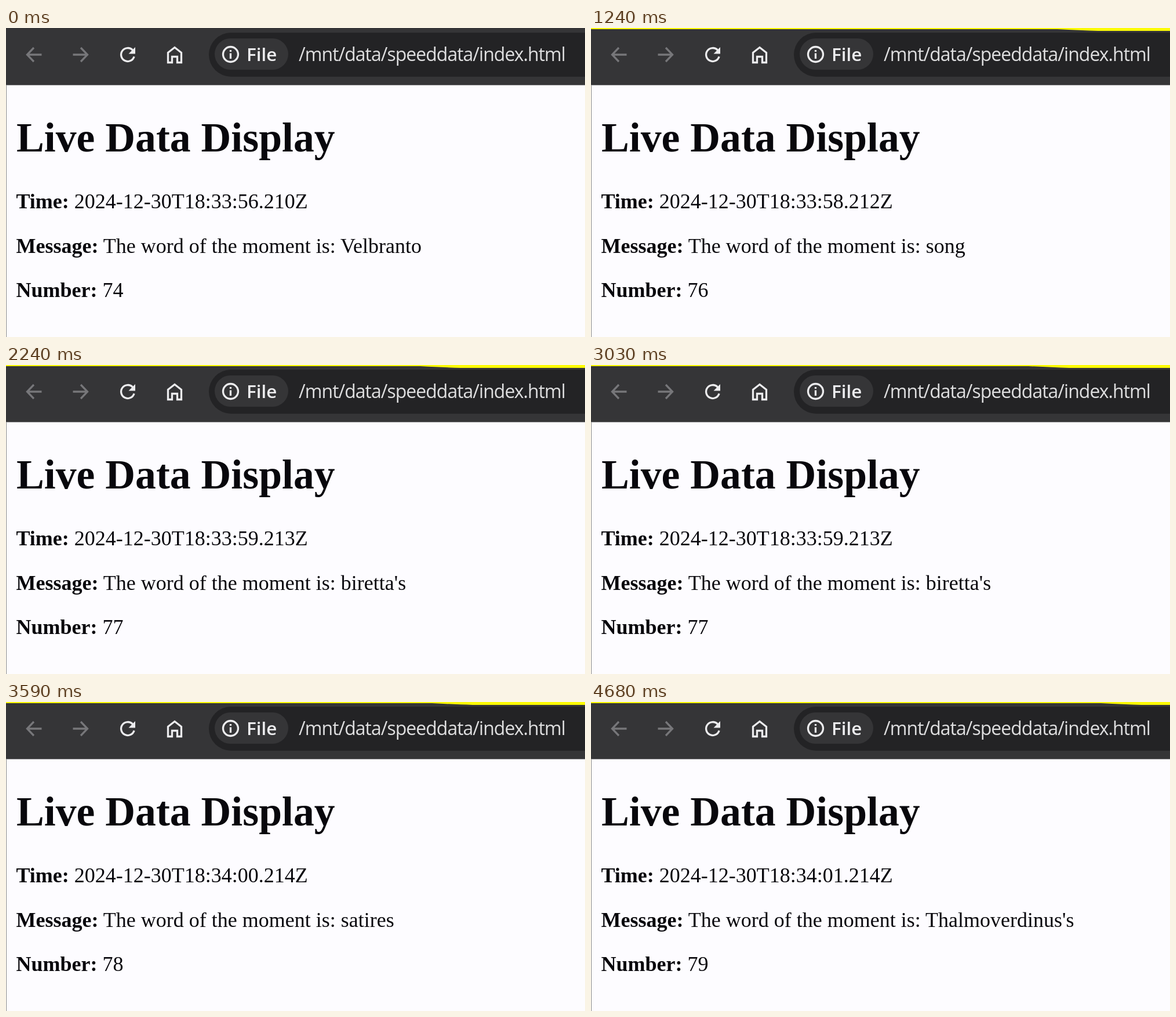
An HTML page for the animation above (5.39 s loop, 999 by 533 pixels).

```html
<!DOCTYPE html>
<html lang="en">
<head>
<meta charset="utf-8">
<title>Live Data Display</title>
<style>
  html, body { margin: 0; width: 100%; height: 100%; overflow: hidden; background: #fdfcff; }
  svg { display: block; }
  .page { font: 36px "Liberation Serif", serif; fill: #08070c; }
  .page .title { font-size: 71.7px; }
  .bold { font-weight: 700; }
  .bar { font: 32px "Open Sans", "Noto Sans", sans-serif; fill: #dededf; }
  .bar .path { letter-spacing: -1px; }
  .bar .chip { font-size: 31.5px; font-weight: 600; fill: #ececee; }
  .icon { fill: none; stroke: #ececee; stroke-width: 3.3; }
  .dim { stroke: #77777a; }
</style>
</head>
<body>
<svg width="999" height="533" viewBox="0 0 999 533">
  <!-- browser toolbar -->
  <rect width="999" height="98" fill="#353537"/>
  <rect y="98" width="999" height="1" fill="#8a8a8c"/>
  <rect x="350" y="8" width="720" height="76" rx="38" fill="#232325"/>
  <rect x="360" y="18" width="127" height="54" rx="27" fill="#353537"/>
  <path id="glow" fill="#fdfb05"/>

  <g class="icon">
    <path class="dim" d="M48 34L36.5 46L48 58M36.5 46H61.5"/>
    <path class="dim" d="M129 34L140.500 46L129 58M140.500 46H115.500"/>
    <path d="M218.500 38.200A11.500 11.500 0 1 0 221.100 49.300"/>
    <path d="M279.500 59.500V42.500L291 33.500L302.500 42.500V59.500H295.500V49.500H286.500V59.500Z"/>
    <circle cx="387.500" cy="45.500" r="13"/>
    <path d="M387.500 43.500V53M387.500 38V41"/>
  </g>
  <path d="M223 33V44.500H211.500Z" fill="#ececee"/>
  <g class="bar">
    <text class="chip" x="415" y="56.500">File</text>
    <text class="path" x="505" y="56.500">/mnt/data/speeddata/index.html</text>
  </g>

  <!-- page -->
  <rect y="99" width="1" height="434" fill="#8c8c8c"/>
  <g class="page">
    <text class="title bold" x="18" y="213">Live Data Display</text>
    <text x="17.500" y="311"><tspan class="bold">Time:</tspan> <tspan id="time"></tspan></text>
    <text x="17.500" y="387.500">
      <tspan class="bold">Message:</tspan> The word of the moment is: <tspan id="word"></tspan>
    </text>
    <text x="17.500" y="464"><tspan class="bold">Number:</tspan> <tspan id="number"></tspan></text>
  </g>
</svg>
<script>
  const LOOP = 5390;
  const FIRST_UPDATE = 240;
  const START = Date.UTC(2024, 11, 30, 18, 33, 56, 210);
  const WORDS = ["Velbranto", "lanterns", "song", "biretta's", "satires", "Thalmoverdinus's"];
  // [start time, x where the yellow top edge thickens]
  const EDGES = [[50, 830], [2240, 740], [3030, 780], [3460, 760], [4680, 905]];
  const el = id => document.getElementById(id);

  function draw(now) {
    const t = now % LOOP;
    const step = Math.min(5, Math.floor((t - FIRST_UPDATE) / 1000) + 1);
    const stamp = START + step * 1000 + Math.min(step, 4);
    el("time").textContent = new Date(stamp).toISOString();
    el("word").textContent = WORDS[step];
    el("number").textContent = 74 + step;

    const edge = EDGES.filter(([from]) => from <= t).pop();
    const x = edge && edge[1];
    el("glow").setAttribute("d", edge
      ? `M0 0H999V5H${x + 45}Q${x + 15} 4 ${x - 25} 2H0Z`
      : "");
    requestAnimationFrame(draw);
  }
  requestAnimationFrame(draw);
</script>
</body>
</html>
```
